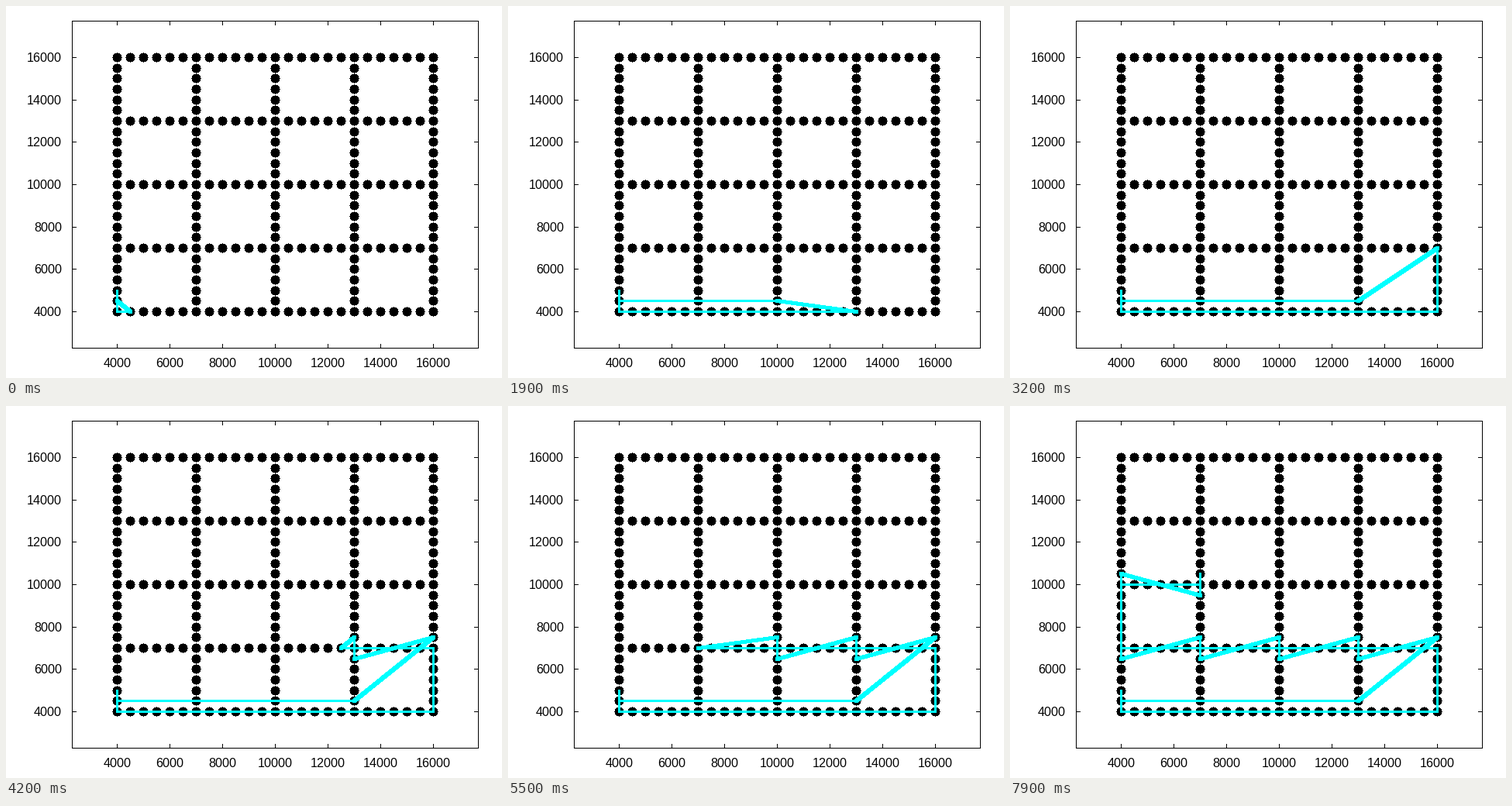
These frames come from a looping animation (640x480 px, 8000 ms). A matplotlib script:

```python
import matplotlib.pyplot as plt
from matplotlib.animation import FuncAnimation
from matplotlib.collections import PatchCollection, PolyCollection
from matplotlib.patches import Circle

W, H, DPI = 640, 480, 100
LEFT, RIGHT, TOP, BOTTOM = 85, 609, 19, 441
STREETS = range(4, 17, 3)
TICK = 5
# Aliased fills cover every pixel they touch, so sizes stay a bit small.
PEN = 1.8
DOT = 5.53
STEP = 0.5

plt.rcParams.update({
    "font.family": "Liberation Sans",
    "font.size": 16 * 72 / DPI,
    "text.hinting": "default",
    "text.hinting_factor": 1,
})


def px(x):
    return 143.5 + round(34 * (x - 4))


def py(y):
    return 394.5 - round(82 / 3 * (y - 4))


def make_route(corners):
    """Half-unit steps along straight legs between corners."""
    route = [corners[0]]
    for (x0, y0), (x1, y1) in zip(corners, corners[1:]):
        n = int(max(abs(x1 - x0), abs(y1 - y0)) / STEP)
        route += [(x0 + (x1 - x0) * k / n, y0 + (y1 - y0) * k / n)
                  for k in range(1, n + 1)]
    return route


def make_outlines(route):
    """Closed outline after every step; side nodes of crossings stay open."""
    used = set(route)
    kept = [(4, 5), (4, 4.5)]
    outlines = []

    def record(i):
        outlines.append(kept + route[i::-1] + [kept[0]])

    for i, (x, y) in enumerate(route[1:], 1):
        record(i)
        if x in STREETS and y in STREETS:
            for side in ((x, y - STEP), (x, y + STEP)):
                if side not in used and side[1] >= 4:
                    kept.append(side)
                    record(i)
    return outlines


def stroke(p, q):
    """Area swept by a square pen from p to q."""
    (x0, y0), (x1, y1) = sorted([(px(p[0]), py(p[1])), (px(q[0]), py(q[1]))])
    h = PEN
    v = h if y1 >= y0 else -h
    return [(x0 - h, y0 - v), (x0 + h, y0 - v), (x1 + h, y1 - v),
            (x1 + h, y1 + v), (x1 - h, y1 + v), (x0 - h, y0 + v)]


fig = plt.figure(figsize=(W / DPI, H / DPI), dpi=DPI, facecolor="white")
ax = fig.add_axes([0, 0, 1, 1])
ax.set_xlim(0, W)
ax.set_ylim(H, 0)
ax.axis("off")


def rule(x0, y0, x1, y1):
    ax.plot([x0, x1], [y0, y1], color="black", lw=72 / DPI, snap=False,
            solid_capstyle="projecting", zorder=1)


l, r, t, b = (v + 0.5 for v in (LEFT, RIGHT, TOP, BOTTOM))
for edge in ((l, t, r, t), (l, b, r, b), (l, t, l, b), (r, t, r, b)):
    rule(*edge)

for v in range(4, 17, 2):
    x, y, label = px(v), py(v), str(v * 1000)
    rule(x, b, x, b - TICK)
    rule(x, t, x, t + TICK)
    rule(l, y, l + TICK, y)
    rule(r, y, r - TICK, y)
    ax.text(x, 466, label, ha="center", va="baseline")
    ax.text(72, y + 5.5, label, ha="right", va="baseline")

halves = [4 + STEP * k for k in range(25)]
nodes = {(a, s) for a in halves for s in STREETS}
nodes |= {(s, a) for a in halves for s in STREETS}
ax.add_collection(PatchCollection(
    [Circle((px(x), py(y)), DOT) for x, y in sorted(nodes)],
    facecolor="black", edgecolor="none", linewidth=0,
    antialiased=False, zorder=2))

trail = PolyCollection([], facecolors="#00ffff", edgecolors="none",
                       linewidths=0, antialiaseds=False, zorder=3)
ax.add_collection(trail, autolim=False)

outlines = make_outlines(make_route(
    [(4, 4), (16, 4), (16, 7), (4, 7), (4, 10), (7, 10)]))


def update(i):
    pts = outlines[i]
    trail.set_verts([stroke(p, q) for p, q in zip(pts, pts[1:])])
    return [trail]


anim = FuncAnimation(fig, update, frames=len(outlines), interval=100,
                     repeat=True, repeat_delay=0, blit=False)
plt.show()
```
